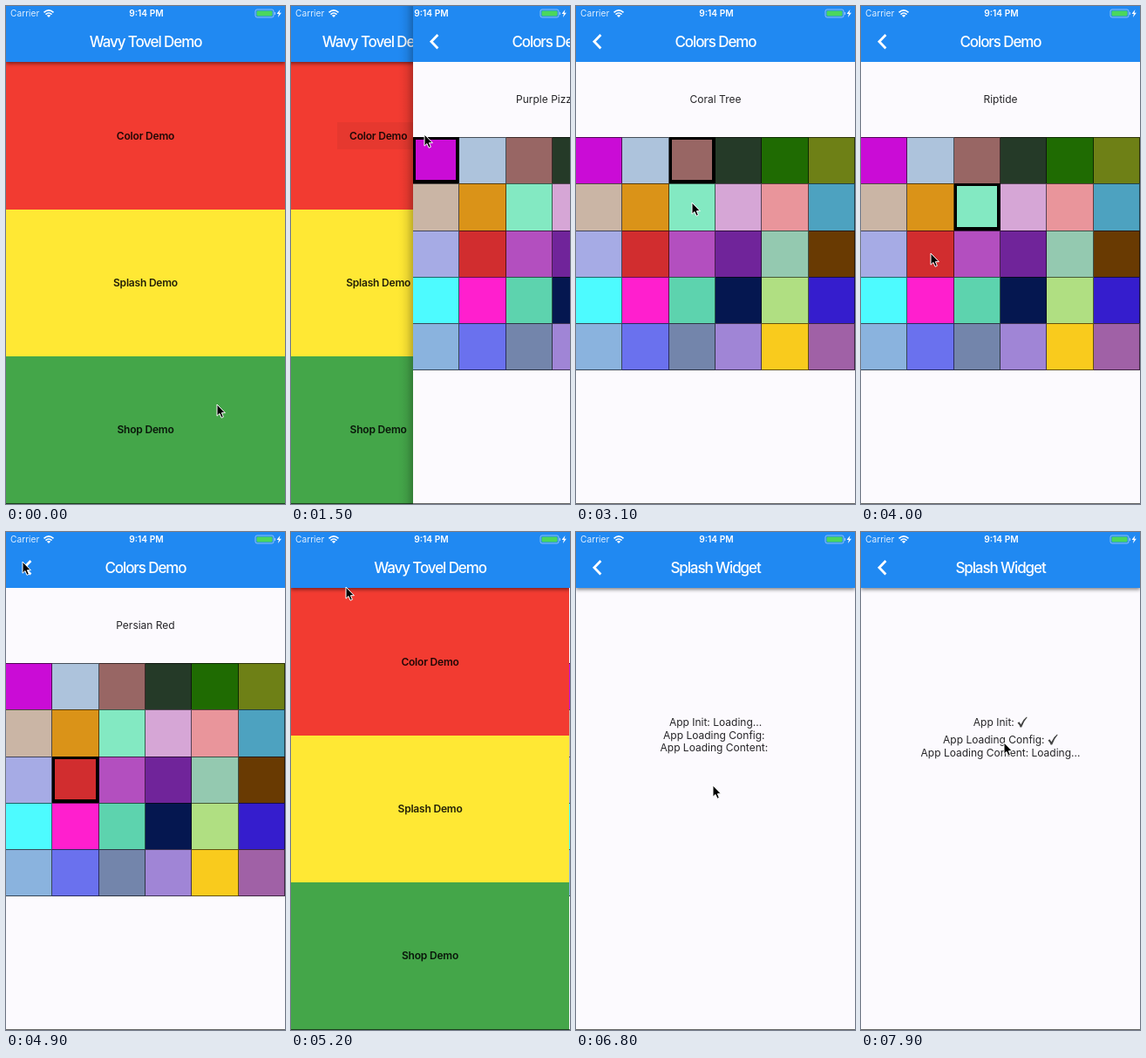
An HTML page for the animation above (8000 ms loop, 320 by 570 pixels).

```html
<!DOCTYPE html>
<html lang="en">
<head>
<meta charset="utf-8">
<style>
html, body { margin: 0; width: 100%; height: 100%; overflow: hidden; }
#stage { position: relative; width: 320px; height: 570px; overflow: hidden; background: #fcfafe;
  font: 12px/20px Inter, "Open Sans", sans-serif; color: #262528; }
#stage div, #stage svg { position: absolute; }
.page { left: 0; top: 0; width: 320px; height: 570px; background: #fcfafe; }
.slide::before { content: ""; position: absolute; left: -18px; width: 18px; height: 570px;
  opacity: var(--shown); background: linear-gradient(90deg, #0000, #0000000a 30%, #00000024 60%, #00000070); }
.bar { width: 320px; height: 64px; background: #2089f2; }
.shade { box-shadow: 0 2px 4px #0007; }
.text { left: 0; width: 320px; text-align: center; white-space: pre; }
.title { top: 31px; color: #fff; font-size: 17px; font-weight: 500; letter-spacing: -1.1px; }
.row { width: 320px; height: 168.5px; }
.label { font-weight: 600; letter-spacing: -.2px; color: #000000dd; }
.press { height: 31px; background: #000; opacity: 0; }
#grid { top: 150px; width: 320px; display: grid;
  grid-template-columns: repeat(6, 1fr); grid-auto-rows: 53.333px; }
#grid i { border: solid #0009; border-width: 1px 1px 0 0; }
#grid i:nth-child(n+25) { border-bottom-width: 1px; }
#grid i.on { border-color: #000; box-shadow: inset 0 -1px 0 3px #000; }
#steps p { margin: 0; line-height: 14.5px; }
#steps p.done { padding-top: 3px; line-height: 17px; }
#steps p svg { position: static; vertical-align: -2px; }
#status { top: 0; left: 0; width: 320px; height: 17px; color: #fff; font-size: 10.2px; line-height: 17px; }
</style>
</head>
<body>
<div id="stage">
  <div class="page" id="home">
    <div class="row" style="top:64px;height:169px;background:#f23b31"></div>
    <div class="row" style="top:233px;background:#ffe834"></div>
    <div class="row" style="top:401px;background:#44a649"></div>
    <div class="press" id="pressColor" style="left:113px;top:133px;width:93px"></div>
    <div class="press" id="pressSplash" style="left:110px;top:302px;width:100px"></div>
    <div class="text label" style="top:139px">Color Demo</div>
    <div class="text label" style="top:307px">Splash Demo</div>
    <div class="text label" style="top:475px">Shop Demo</div>
    <div class="bar shade"></div>
    <div class="text title">Wavy Tovel Demo</div>
  </div>
  <div class="page slide" id="colors">
    <div class="bar"></div>
    <div class="text title">Colors Demo</div>
    <div class="text" id="name" style="top:97px"></div>
    <div id="grid"></div>
  </div>
  <div class="page slide" id="splash">
    <div class="bar shade"></div>
    <div class="text title">Splash Widget</div>
    <div class="text" id="steps"></div>
  </div>
  <div id="status">
    <div style="left:5px;opacity:.85">Carrier</div>
    <div class="text" style="left:1px;font-weight:600">9:14 PM</div>
    <svg width="320" height="17" fill="none" stroke="#fff">
      <path d="M43.5 7.4Q49 2.4 54.5 7.4M45.5 9.6Q49 6.4 52.5 9.6" stroke-width="1.6"/>
      <path d="M46.8 10.8Q49 9 51.2 10.8L49 13Z" fill="#fff" stroke="none"/>
      <rect x="286" y="4" width="21" height="9" rx="2" stroke="#a9cdf8" stroke-width=".8"/>
      <rect x="287.5" y="5.4" width="18" height="6.2" rx="1" fill="#4bd75c" stroke="none"/>
      <path d="M308.4 7v3" stroke="#a9cdf8"/>
      <path d="M314.5 4l-4 5h2.4l-1 4 4-5.2h-2.4z" fill="#fff" stroke="none"/>
    </svg>
  </div>
  <div style="top:569px;width:320px;height:1px;background:#0009"></div>
  <svg id="cursor" width="14" height="20" style="left:-1px;top:-1px">
    <path d="M1 1V14.2L4 11.5L6 16.3L8.4 15.3L6.4 10.7H10.4Z" fill="#000" stroke="#fff"/>
  </svg>
</div>
<script>
const $ = id => document.getElementById(id);
const LOOP = 8000, FRAME = 100, SLIDE = 330;

const palette = `ca0cd6 adc3dc 986664 253a28 1f6b02 6e8016
  cab5a5 da9318 83e9c2 d6a6d6 e9959b 4da2c0
  a6abe5 d12d2f b34fbf 70249a 94c9b0 693a02
  4dfbff ff1fce 5dd3ae 051750 b0df82 351dcd
  8ab3de 6a71ee 7385ab a085d6 f9cb1d a061a6`.split(/\s+/);
$('grid').innerHTML = palette.map(c => `<i style="background:#${c}"></i>`).join('');
const cells = [...$('grid').children];

for (const id of ['colors', 'splash'])
  $(id).insertAdjacentHTML('beforeend', `<svg width="40" height="65">
    <path d="M28.4 33L20.9 40.7L28.4 48.4" fill="none" stroke="#fff" stroke-width="2.8"/></svg>`);

// [time, cell, colour name]
const picks = [[0, 0, 'Purple Pizzazz'], [2500, 2, 'Coral Tree'],
  [3200, 8, 'Riptide'], [4100, 13, 'Persian Red']];

// [time, x, y] of the pointer tip
const path = [[0, 242, 456], [400, 242, 456], [1100, 155, 150], [1500, 153, 147],
  [1900, 153, 147], [2400, 133, 180], [2700, 133, 180], [3000, 133, 225], [3400, 133, 225],
  [3900, 80, 283], [4300, 80, 283], [4750, 19, 34], [4900, 19, 34], [5200, 63, 63],
  [5600, 152, 318], [6000, 152, 321], [6500, 152, 321], [7200, 164, 241], [8000, 164, 241]];

const tasks = [['App Init: ', 5800, 6900], ['App Loading Config: ', 6900, 7900],
  ['App Loading Content: ', 7900, 9000]];
const check = `<svg width="12" height="13"><path d="M.5 7.6L2.4 6.2L4.4 9.2Q6.8 3.4 11 .4L11.6 1.2
  Q7.6 5.6 5.2 12.4H3.6Q2.4 9.4 .5 7.6Z" fill="#444"/></svg>`;

const clamp = v => Math.min(1, Math.max(0, v));

// cubic-bezier(.4, 0, .2, 1)
function ease(x) {
  let lo = 0, hi = 1, s = .5;
  for (let i = 0; i < 24; i++) {
    s = (lo + hi) / 2;
    const bx = 1.2 * s * (1 - s) ** 2 + .6 * s * s * (1 - s) + s ** 3;
    if (bx < x) lo = s; else hi = s;
  }
  return s * s * (3 - 2 * s);
}
const slide = (t, start) => ease(clamp((t - start) / SLIDE));

function pointer(t) {
  const i = path.findIndex(p => p[0] > t), [a, ax, ay] = path[i - 1], [b, bx, by] = path[i];
  const k = (t - a) / (b - a), e = k * k * (3 - 2 * k);
  return [ax + (bx - ax) * e, ay + (by - ay) * e];
}

function place(id, shown) {
  const style = $(id).style;
  style.left = Math.round(320 * (1 - shown)) + 'px';
  style.visibility = shown > .001 ? 'visible' : 'hidden';
  style.setProperty('--shown', shown);
}

const press = (t, start) => .05 * clamp((t - start) / 100) * clamp((start + 600 - t) / 200);

function draw(t) {
  const colors = slide(t, 1376) - slide(t, 4900), splash = slide(t, 5854);
  $('home').style.left = -320 / 3 * (colors + splash) + 'px';
  place('colors', colors);
  place('splash', splash);
  $('pressColor').style.opacity = press(t, 1200);
  $('pressSplash').style.opacity = press(t, 5650);

  const [, cell, name] = picks.filter(p => p[0] <= t).pop();
  $('name').textContent = name;
  cells.forEach((c, i) => c.className = i === cell ? 'on' : '');

  let height = 0;
  $('steps').innerHTML = tasks.map(([label, start, end]) => {
    const done = t >= end;
    height += done ? 20 : 14.5;
    return `<p class="${done ? 'done' : ''}">${label}${done ? check : t >= start ? 'Loading...' : ''}</p>`;
  }).join('');
  $('steps').style.top = 232.75 - height / 2 + 'px';

  const [x, y] = pointer(t);
  $('cursor').style.transform = `translate(${Math.round(x)}px, ${Math.round(y)}px)`;
}

let last = -1;
const begin = performance.now();
function tick() {
  const t = Math.floor((performance.now() - begin) % LOOP / FRAME) * FRAME;
  if (t !== last) draw(last = t);
  requestAnimationFrame(tick);
}
tick();
</script>
</body>
</html>
```
